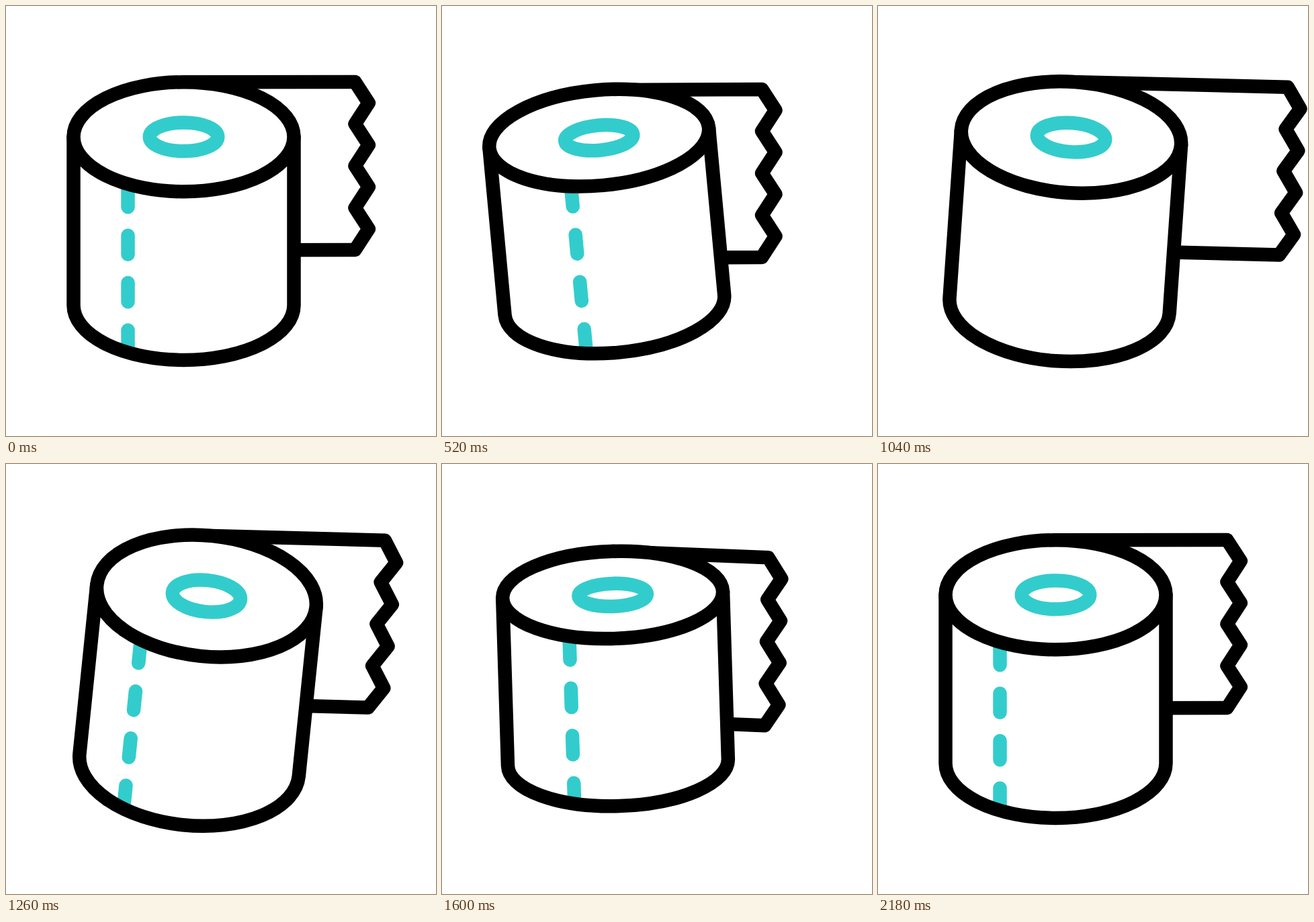
Animation of 640 by 640 pixels, one loop 2600 ms. Source, as an HTML page:

```html
<!DOCTYPE html>
<html lang="en">
<head>
<meta charset="utf-8">
<title>Paper roll</title>
<style>
  html, body { margin: 0; height: 100%; overflow: hidden; background: #fff; }
  svg { display: block; width: 100%; height: 100%; }
  .ink, .teal { fill: none; stroke: #000; stroke-width: 20.5; stroke-linecap: round; stroke-linejoin: round; }
  .teal { stroke: #3cc; }
  .white { fill: #fff; }
</style>
</head>
<body>
<svg viewBox="0 0 640 640">
  <defs><clipPath id="clip"><path id="clipShape"/></clipPath></defs>
  <path id="sparks" class="teal"/>
  <path id="paper" class="ink white"/>
  <g id="roll">
    <path id="fill" class="white"/>
    <g clip-path="url(#clip)"><path id="dashes" class="teal"/></g>
    <path id="side" class="ink"/>
    <ellipse id="top" class="ink white" rx="164"/>
    <ellipse id="core" class="teal" rx="50.75"/>
  </g>
</svg>
<script>
const LOOP = 2600, STEP = 20, START = 200, END = 2180;
const RX = 164, RY = 81.5, CX = 264.5, TOP_Y = 194.75, PIVOT_Y = 527;
const TURN = 360; // distance between two perforation lines

const $ = id => document.getElementById(id);
const path = (id, d) => $(id).setAttribute('d', d);
const rad = deg => deg * Math.PI / 180;
const smooth = u => u * u * (3 - 2 * u);
const smoother = u => u * u * u * (u * (6 * u - 15) + 10);

// Eases through [time, value] turning points
function swing(t, keys, ease = smooth) {
  let [t0, v0] = keys[0];
  for (const [t1, v1] of keys) {
    if (t < t1) return t <= t0 ? v0 : v0 + (v1 - v0) * ease((t - t0) / (t1 - t0));
    [t0, v0] = [t1, v1];
  }
  return v0;
}

const tilt = t => swing(t, [[START, 0], [620, -6.2], [1225, 6.9], [1410, -4.2], [1840, 1.64], [END, 0]]);
const depth = t => swing(t, [[START, RY], [720, 65.8], [1230, 90.3], [1600, 65], [1840, 91], [END, RY]]);
const spin = t => swing(t, [[START, 0], [1540, 377], [1900, TURN]], smoother);
const paperX = t => swing(t, [[START, 519.5], [610, 470], [790, 470], [1060, 612], [1550, 480], [1840, 551], [END, 519.5]]);
const paperY = t => swing(t, [[START, 113], [760, 131], [1230, 115], [1420, 97], [1600, 139.3], [1840, 113], [END, 113]]);
const paperTilt = t => swing(t, [[840, 0], [1240, 5.8], [1600, 1.2], [1840, 1.6], [END, 0]]);

function drawPaper(x, y, edge, angle, ry) {
  const arm = PIVOT_Y - TOP_Y, sin = Math.sin(rad(edge)), cos = Math.cos(rad(edge));
  const left = CX + arm * Math.sin(rad(angle));
  const topY = PIVOT_Y - arm * Math.cos(rad(angle)) - ry;
  const slope = (y - topY) / (x - left);
  const pts = [[left, topY]];
  for (let i = 0; i < 9; i++) {
    const zx = i % 2 * 20.3, zy = i * 31.25;
    pts.push([x + zx * cos - zy * sin, y + zx * sin + zy * cos]);
  }
  const [ex, ey] = pts[9], inner = left + 100;
  pts.push([inner, ey - (ex - inner) * slope]);
  path('paper', 'M' + pts.join('L'));
}

function drawRoll(angle, ry, shift) {
  const grow = ry - RY, h = 250.7 + grow * .16 + Math.abs(grow) * .08;
  const side = `M${-RX} 0V${h}A${RX} ${ry} 0 0 0 ${RX} ${h}V0`;
  $('roll').setAttribute('transform',
    `rotate(${angle} ${CX} ${PIVOT_Y}) translate(${CX} ${TOP_Y})`);
  for (const id of ['side', 'fill', 'clipShape']) path(id, side);
  $('top').setAttribute('ry', ry);
  $('core').setAttribute('ry', ry * .262);
  let d = '';
  for (const x of [shift - 83, shift - 83 - TURN])
    for (let i = 0; i < 4; i++) d += `M${x} ${76.2 + i * 70.5 + grow * .6}v28.4`;
  path('dashes', d);
}

function drawSparks(t) {
  const head = swing(t, [[725, 0], [865, 1]]), tail = swing(t, [[770, 0], [950, 1]]);
  let d = '';
  if (head > 0 && tail < 1) {
    for (const side of [-1, 0, 1]) {
      const at = k => `${486.5 + side * (84.6 + 27.4 * k)} ${66 - (side ? 33.5 : 44.5) * k}`;
      d += `M${at(tail)}L${at(head)}`;
    }
  }
  path('sparks', d);
}

function frame(now) {
  const t = Math.floor(now % LOOP / STEP) * STEP;
  const angle = tilt(t), ry = depth(t);
  drawPaper(paperX(t), paperY(t), paperTilt(t), angle, ry);
  drawRoll(angle, ry, spin(t));
  drawSparks(t);
}

const start = performance.now();
function tick() {
  frame(performance.now() - start);
  requestAnimationFrame(tick);
}
tick();
</script>
</body>
</html>
```
